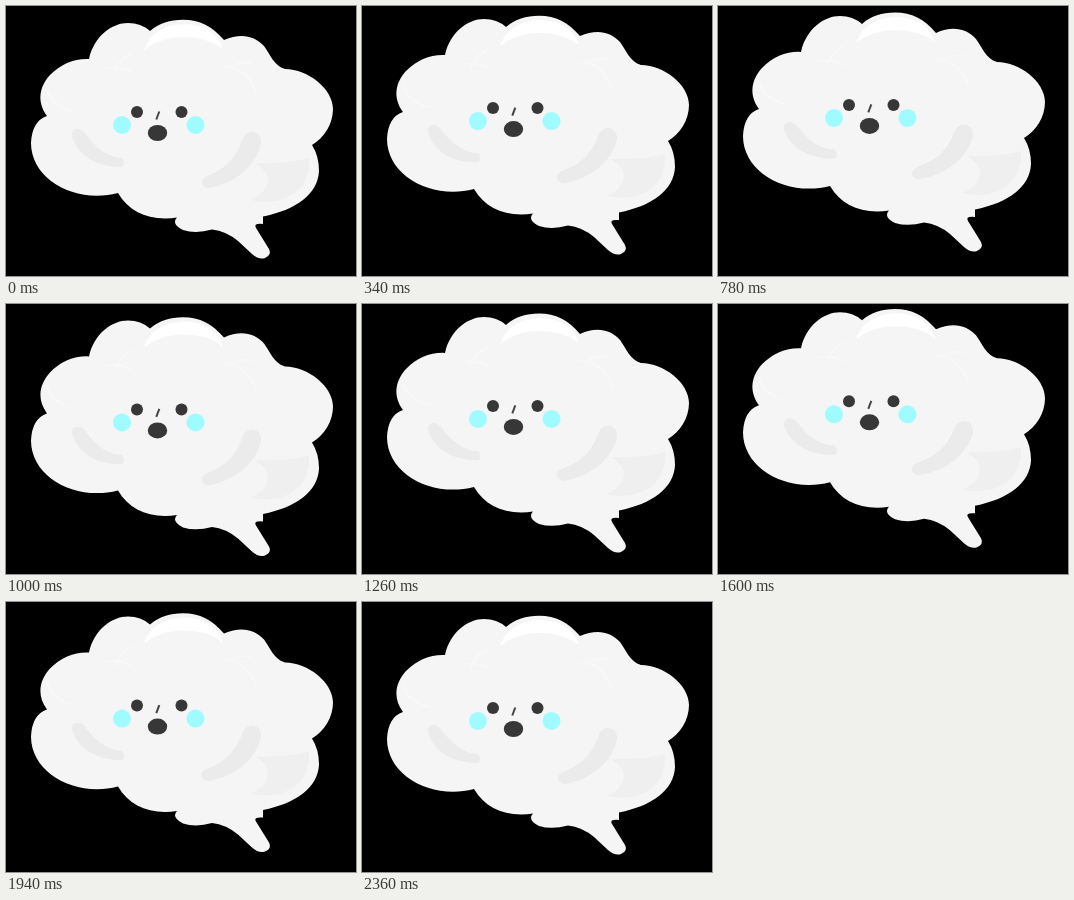
An HTML page that plays this animation: 350 by 270 pixels, repeating every 2.4 s.

```html
<!DOCTYPE html>
<html>
<head>
<meta charset="utf-8">
<style>
  html, body { margin: 0; width: 100%; height: 100%; overflow: hidden; background: #000; }
  svg { display: block; width: 350px; height: 270px; }
  .skin { fill: #f5f5f5; }
  .fold { fill: none; stroke: #f9f9f9; stroke-width: 2; stroke-linecap: round; }
  .arm { fill: #ebebeb; }
  .ink { fill: #373737; }
  .blush { fill: #9ffbff; }
</style>
</head>
<body>
<svg viewBox="0 0 350 270">
  <g id="brain">
    <!-- outline, clockwise from the upper left lobe -->
    <path class="skin" d="M83 53C88 30 106 17 122 17Q135 17 144 25C153 17 164 13.700 177 13.700C194 13.700 206 20 218 34C234 27 248 29 258 40C264 48 268 60 279 63C302 63 327 83 327 103C327 118 318 132 306 139Q313 150 313 165C312 188 290 204 257 210.500L257 218Q247 217 250 222L263 243Q266 249 259 252Q253 254 246 248L232 235Q220 225 206 223.500Q190 228 177 224Q165 218 171 211.500Q165 212.500 159 212.500C138 212 122 204 112 187C70 198 25 174 25 137Q26 115 41 110C30 95 34 80 44 69Q61 52 83 53Z"/>
    <path fill="#efefef" d="M303 152Q282 158 249 157Q263 165 262 176Q260 187 245 194C275 201 305 187 303 152Z"/>
    <path class="fold" d="M41 84Q48 101 67 105M126 47Q113 53 109 66M100 62Q114 60 126 66M217 60Q241 61 250 86M227 60Q235 55 246 57" opacity=".7"/>
    <path fill="#fff" d="M138 44Q147 19 178 18Q209 19 217 43Q201 31 178 31Q155 31 138 44Z"/>
    <path class="arm" id="left" d="M66 130C65 124 72 120 78 126C88 140 100 151 116 152Q120 157 116 161C92 161 72 151 66 130Z"/>
    <path class="arm" id="right" d="M237 132C242 122 256 125 255 137C251 158 232 176 204 182C195 182 193 174 201 170C221 162 230 152 237 132Z"/>
    <circle class="blush" cx="116" cy="119" r="9"/>
    <circle class="blush" cx="189.500" cy="119" r="9"/>
    <circle class="ink" cx="131" cy="106" r="6"/>
    <circle class="ink" cx="175.500" cy="106" r="6"/>
    <ellipse class="ink" cx="151.500" cy="127" rx="9.700" ry="8"/>
    <path d="M153.300 105.500L150.300 113.500" stroke="#444" stroke-width="2"/>
  </g>
</svg>
<script>
  const LOOP = 2400;
  const [brain, left, right] = ['brain', 'left', 'right'].map(id => document.getElementById(id));

  // The curve cubic-bezier(.25, .1, .25, 1), solved for x by bisection.
  function ease(x) {
    const bezier = (s, a, b) => 3 * s * (1 - s) ** 2 * a + 3 * s * s * (1 - s) * b + s ** 3;
    let lo = 0, hi = 1;
    for (let i = 0; i < 20; i++) {
      const mid = (lo + hi) / 2;
      if (bezier(mid, .25, .25) < x) lo = mid; else hi = mid;
    }
    return bezier(lo, .1, 1);
  }

  // [start, end, from, to]
  const moves = [
    [200, 720, 0, 1],
    [720, 1130, 1, 0],
    [1130, 1600, 0, 1],
    [1600, 2400, 1, 0]
  ];

  function lift(t) {
    const move = moves.find(([start, end]) => t >= start && t < end);
    if (!move) return 0;
    const [start, end, from, to] = move;
    return from + (to - from) * ease((t - start) / (end - start));
  }

  function draw() {
    const h = lift(performance.now() % LOOP);
    brain.setAttribute('transform', `translate(0 ${-8.7 * h})`);
    left.setAttribute('transform', `rotate(${-2 * h} 72 127)`);
    right.setAttribute('transform', `rotate(${3 * h} 247 134)`);
    requestAnimationFrame(draw);
  }
  draw();
</script>
</body>
</html>
```
